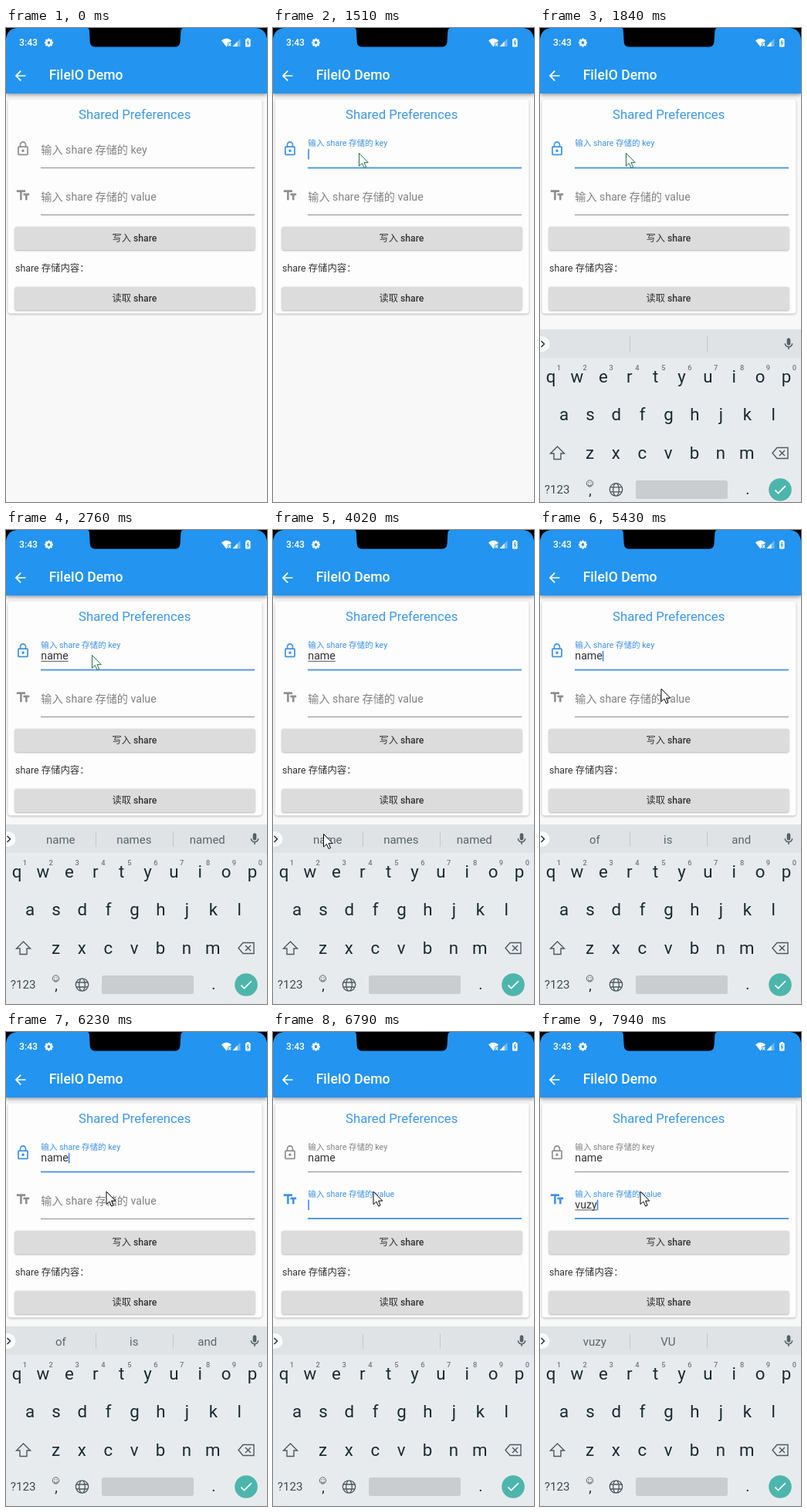
Animation of 338x615 px, one loop 8 s. Source, as an HTML page with a canvas:

```html
<!DOCTYPE html>
<html lang="zh">
<head>
<meta charset="utf-8">
<title>FileIO Demo</title>
<style>
html, body { margin: 0; width: 100%; height: 100%; overflow: hidden; background: #f8f8f8; }
canvas { display: block; width: 338px; height: 615px; }
</style>
</head>
<body>
<canvas id="stage"></canvas>
<script>
const W = 338, H = 615, LOOP = 8000;
const BLUE = '#2394f0', FOCUS = '#3f92e8', GREY = '#828282', INK = '#333', KEY = '#1a2b31';
const FONT = 'Roboto, "Noto Sans CJK SC", "Noto Sans CJK", sans-serif';
const canvas = document.getElementById('stage');
const dpr = window.devicePixelRatio || 1;
canvas.width = W * dpr;
canvas.height = H * dpr;
const c = canvas.getContext('2d');

const ICONS = {
  back: 'M20 11H7.83l5.59-5.59L12 4l-8 8 8 8 1.41-1.41L7.83 13H20z',
  lock: 'M18 8h-1V6c0-2.76-2.24-5-5-5S7 3.24 7 6v2H6c-1.1 0-2 .9-2 2v10c0 1.1.9 2 2 2h12c1.1 0 2-.9 2-2V10c0-1.1-.9-2-2-2zM8.9 6c0-1.71 1.39-3.1 3.1-3.1s3.1 1.39 3.1 3.1v2H8.9V6zM18 20H6V10h12v10zM12 17c1.1 0 2-.9 2-2s-.9-2-2-2-2 .9-2 2 .9 2 2 2z',
  text: 'M2.5 4v3h5v12h3V7h5V4zM21.5 9h-9v3h3v7h3v-7h3z',
  mic: 'M12 14c1.66 0 3-1.34 3-3V5c0-1.66-1.34-3-3-3S9 3.34 9 5v6c0 1.66 1.34 3 3 3zM17 11c0 2.76-2.24 5-5 5s-5-2.24-5-5H5c0 3.53 2.61 6.43 6 6.92V21h2v-3.08c3.39-.49 6-3.39 6-6.92z',
  check: 'M9 16.17L4.83 12l-1.42 1.41L9 19 21 7l-1.41-1.41z',
  arrow: 'M0 0V16.6L3.9 13 6.6 19 9.1 17.9 6.5 12.1H11.8z'
};
for (const k in ICONS) ICONS[k] = new Path2D(ICONS[k]);

const clamp = v => Math.max(0, Math.min(1, v));
const ramp = (t, a, b) => { const p = clamp((t - a) / (b - a)); return p * p * (3 - 2 * p); };
const mix = (a, b, p) => a + (b - a) * p;
const latest = (list, t, none) => list.reduce((v, [at, x]) => t >= at ? x : v, none);

function rect(x, y, w, h, color) {
  c.fillStyle = color;
  c.fillRect(x, y, w, h);
}

function round(x, y, w, h, r, color) {
  c.fillStyle = color;
  c.beginPath();
  c.roundRect(x, y, w, h, r);
  c.fill();
}

function disc(x, y, r, color) {
  c.fillStyle = color;
  c.beginPath();
  c.arc(x, y, r, 0, 7);
  c.fill();
}

function line(points, color, width = 1.3, close = false) {
  c.strokeStyle = color;
  c.lineWidth = width;
  c.beginPath();
  points.forEach(([x, y], i) => i ? c.lineTo(x, y) : c.moveTo(x, y));
  if (close) c.closePath();
  c.stroke();
}

function text(s, x, y, size, color, align = 'left', weight = 400) {
  c.font = `${weight} ${size}px ${FONT}`;
  c.textAlign = align;
  c.fillStyle = color;
  c.fillText(s, x, y);
  return c.measureText(s).width;
}

function icon(name, x, y, size, color) {
  c.save();
  c.translate(x - size / 2, y - size / 2);
  c.scale(size / 24, size / 24);
  c.fillStyle = color;
  c.fill(ICONS[name], 'evenodd');
  c.restore();
}

function shadow(color, blur, dy) {
  c.shadowColor = color;
  c.shadowBlur = blur * dpr;
  c.shadowOffsetY = dy * dpr;
}

function lifted(x, y, w, h, r, color, alpha, blur, dy) {
  c.save();
  shadow(`rgba(0,0,0,${alpha})`, blur, dy);
  round(x, y, w, h, r, color);
  c.restore();
}

function gear(x, y) {
  c.save();
  c.translate(x, y);
  for (let i = 0; i < 4; i++) {
    rect(-1.3, -5.5, 2.6, 11, '#fff');
    c.rotate(Math.PI / 4);
  }
  disc(0, 0, 4.1, '#fff');
  disc(0, 0, 1.9, BLUE);
  c.restore();
}

function triangle(points, color) {
  c.fillStyle = color;
  c.beginPath();
  points.forEach(([x, y]) => c.lineTo(x, y));
  c.fill();
}

function statusBar() {
  text('3:43', 17, 23, 12.2, '#fff', 'left', 500);
  gear(55.5, 19);
  c.fillStyle = '#fff';
  c.beginPath();
  c.moveTo(285.5, 24.5);
  c.lineTo(279, 16.3);
  c.quadraticCurveTo(285.5, 10.8, 292, 16.3);
  c.fill();
  rect(287.2, 18.6, 5, 6, BLUE);
  line([[288, 19.5], [291.2, 23.3]], '#fff', 1.2);
  line([[291.2, 19.5], [288, 23.3]], '#fff', 1.2);
  triangle([[293.5, 24], [303.5, 24], [303.5, 13.5]], 'rgba(255,255,255,.35)');
  triangle([[293.5, 24], [299.6, 24], [299.6, 17.6]], '#fff');
  round(310, 14.2, 6.6, 10.2, 1, '#fff');
  rect(311.8, 13, 3, 2, '#fff');
  line([[313.9, 15.8], [312.3, 19.3], [314.3, 19.3], [312.8, 22.6]], BLUE, 1.1);
}

function frameEdges() {
  c.fillStyle = '#000';
  const r = 14;
  for (const side of [0, 1]) {
    c.save();
    if (side) { c.translate(W, 0); c.scale(-1, 1); }
    c.beginPath();
    c.moveTo(0, 0);
    c.lineTo(r, 0);
    c.quadraticCurveTo(2, 1, 0, r);
    c.fill();
    c.restore();
  }
  c.beginPath();
  c.moveTo(106, 0);
  c.quadraticCurveTo(108, 1, 108, 5);
  c.lineTo(108.7, 18);
  c.quadraticCurveTo(109.2, 24.6, 116, 24.6);
  c.lineTo(218, 24.6);
  c.quadraticCurveTo(225, 24.6, 225.5, 18);
  c.lineTo(226.3, 5);
  c.quadraticCurveTo(226.5, 1, 229, 0);
  c.fill();
}

function appBar() {
  c.save();
  shadow('rgba(0,0,0,.4)', 5, 2);
  rect(0, 0, W, 85, BLUE);
  c.restore();
  statusBar();
  icon('back', 18.6, 62, 20.7, '#fff');
  text('FileIO Demo', 55.7, 67.3, 17.6, '#fff', 'left', 500);
  frameEdges();
}

function button(y, label) {
  lifted(11.7, y, 310.5, 30, 2, '#dcdcdc', .35, 2.5, .8);
  c.font = `400 12.2px ${FONT}`;
  const a = c.measureText(label + ' ').width;
  c.font = `500 12.2px ${FONT}`;
  const x = 166.5 - (a + c.measureText('share').width) / 2;
  text(label, x, y + 19.2, 12.2, INK);
  text('share', x + a, y + 19.2, 12.2, INK, 'left', 500);
}

// f: top offset, label, icon, floating amount, focus amount, value, composing, caret
function field(f) {
  const y = f.y, on = f.focus > .5, tint = on ? FOCUS : GREY;
  icon(f.icon, 22, y + 156.6, 20.7, f.lit ? FOCUS : '#8f8f8f');
  text(f.label, 45.3, y + mix(163, 153.4, f.float), mix(14.15, 10.6, f.float), tint);
  rect(45, Math.round(y + 181), 277, 1, '#8c8c8c');
  if (f.focus > 0) {
    c.globalAlpha = f.focus;
    rect(45, y + 180.6, 277, 1.8, FOCUS);
    c.globalAlpha = 1;
  }
  let w = 0;
  if (f.value) {
    w = text(f.value, 45.3, y + 168.3, 14.2, INK);
    if (f.composing) rect(45.3, y + 169.8, w, 1, '#555');
  }
  if (f.caret) rect(45.3 + w, y + 157, 1.6, 13.5, '#4285f4');
}

function keyRow(letters, x, y, numbers) {
  [...letters].forEach((s, i) => {
    const cx = x + i * 33.9;
    text(s, cx, y, 22.3, KEY, 'center');
    if (numbers) text((i + 1) % 10, cx + 10.3, y - 16.3, 9.3, '#70797e', 'center', 500);
  });
}

function keyboard(words) {
  rect(0, 382, W, 233, '#e8ebed');
  rect(0, 382, W, 37, '#dfe3e6');
  disc(2.5, 401, 10, '#fafbfb');
  line([[1.5, 397], [5.5, 401], [1.5, 405]], '#263238', 1.5);
  for (const x of [116, 216]) rect(x, 391, 1, 20, '#c3c8cb');
  words.forEach((s, i) => text(s, 70.8 + i * 95, 406.6, 15, '#5b656a', 'center'));
  icon('mic', 322, 401, 18.5, '#566166');

  keyRow('qwertyuiop', 14, 451, true);
  keyRow('asdfghjkl', 31, 500);
  keyRow('zxcvbnm', 64.5, 550);

  const dim = '#4c595f';
  line([[22.5, 534], [31.5, 543], [27, 543], [27, 550.5], [18, 550.5], [18, 543], [13.5, 543]], dim, 1.4, true);
  line([[301, 542.5], [307, 535.5], [321, 535.5], [321, 549.5], [307, 549.5]], dim, 1.4, true);
  line([[310, 539], [317, 546]], dim, 1.4);
  line([[317, 539], [310, 546]], dim, 1.4);

  text('?123', 22.2, 595, 15.2, '#3f4c52', 'center');
  text(',', 65, 597, 18, KEY, 'center');
  c.strokeStyle = '#5b656a';
  c.lineWidth = 1;
  c.beginPath();
  c.arc(64.5, 582, 4.2, 0, 7);
  c.moveTo(66.7, 582.8);
  c.arc(64.5, 582.8, 2.2, 0, Math.PI);
  c.stroke();
  disc(63, 580.8, .7, '#5b656a');
  disc(66, 580.8, .7, '#5b656a');

  c.strokeStyle = dim;
  c.lineWidth = 1.3;
  c.beginPath();
  c.arc(98.5, 590, 8.2, 0, 7);
  c.moveTo(102.3, 590);
  c.ellipse(98.5, 590, 3.8, 8.2, 0, 0, 7);
  for (const y of [587, 593]) { c.moveTo(91, y); c.lineTo(106, y); }
  c.stroke();

  round(124, 578, 119, 24, 2.5, '#c9cdd0');
  text('.', 269, 596, 20, KEY, 'center');
  disc(311, 590, 14.8, '#4db6ac');
  icon('check', 311, 590, 20, '#fff');
}

const PATH = [
  [170, 235, 382], [350, 178, 262], [520, 128, 138], [640, 114, 150], [750, 111, 162],
  [3120, 111, 162], [3400, 62, 240], [3620, 8, 335], [3740, 2, 372], [3960, 64, 393], [4020, 65, 394],
  [4400, 65, 394], [4750, 130, 450], [5190, 284, 554], [5240, 304, 568], [5340, 235, 370],
  [5430, 156.5, 205.5], [5480, 155, 206], [5950, 129.5, 206.5], [LOOP, 129.5, 206.5]
];
const CLICKS = [[930, 1150], [4190, 4420], [6330, 6510]];

function pointer(t) {
  if (t < PATH[0][0]) return;
  const i = PATH.findIndex(k => t < k[0]), a = PATH[i - 1], b = PATH[i];
  const p = (t - a[0]) / (b[0] - a[0]);
  const x = mix(a[1], b[1], p), y = mix(a[2], b[2], p);
  if (CLICKS.some(([s, e]) => t >= s && t < e)) {
    c.strokeStyle = 'rgba(120,120,120,.75)';
    c.lineWidth = 1.5;
    c.beginPath();
    c.arc(x, y, 14, 0, 7);
    c.stroke();
  }
  c.save();
  c.translate(x + .5, y + .5);
  c.fillStyle = '#fff';
  c.fill(ICONS.arrow);
  c.strokeStyle = t >= 1430 && t < 3120 ? '#1f7048' : '#000';
  c.lineWidth = 1;
  c.stroke(ICONS.arrow);
  c.restore();
}

const KEY_TEXT = [[2250, 'n'], [2660, 'na'], [2710, 'nam'], [2760, 'name']];
const VALUE_TEXT = [[7580, 'v'], [7670, 'vu'], [7760, 'vuz'], [7940, 'vuzy']];
const WORDS = [
  [2480, ['name', 'names', 'named']], [4420, ['of', 'is', 'and']], [6560, []],
  [7580, ['v']], [7670, ['vu', 'VU']], [7760, ['vuz', 'VU']], [7940, ['vuzy', 'VU']]
];

function draw(t) {
  c.setTransform(dpr, 0, 0, dpr, 0, 0);
  rect(0, 0, W, H, '#f8f8f8');
  lifted(2.5, 92.5, 329, 278, 4, '#fdfdfd', .28, 3, 1);
  text('Shared Preferences', 166.7, 118, 16.7, '#3d97ea', 'center');

  const second = t >= 6590;
  const blink = (t - 4190 + 1020 * 8) % 1020 < 510;
  field({
    y: 0, label: '输入 share 存储的 key', icon: 'lock',
    float: ramp(t, 1390, 1510), focus: ramp(t, 1390, 1500) - ramp(t, 6590, 6790),
    lit: t >= 1200 && t < 6650, value: latest(KEY_TEXT, t, ''), composing: t < 4420,
    caret: t >= 1430 && !second && blink
  });
  field({
    y: 60.6, label: '输入 share 存储的 value', icon: 'text',
    float: ramp(t, 6590, 6790), focus: ramp(t, 6590, 6790),
    lit: t >= 6650, value: latest(VALUE_TEXT, t, ''), composing: true,
    caret: second && (t < 7100 || t >= 7580)
  });

  button(258, '写入');
  text('share 存储内容：', 12, 316.3, 12.4, INK);
  button(336, '读取');
  appBar();

  const up = clamp((t - 1640) / 250);
  if (up > 0) {
    c.save();
    c.translate(0, 233 * (1 - up) ** 2);
    keyboard(latest(WORDS, t, []));
    c.restore();
  }
  pointer(t);
}

function tick() {
  draw(performance.now() % LOOP);
  requestAnimationFrame(tick);
}
tick();
</script>
</body>
</html>
```
